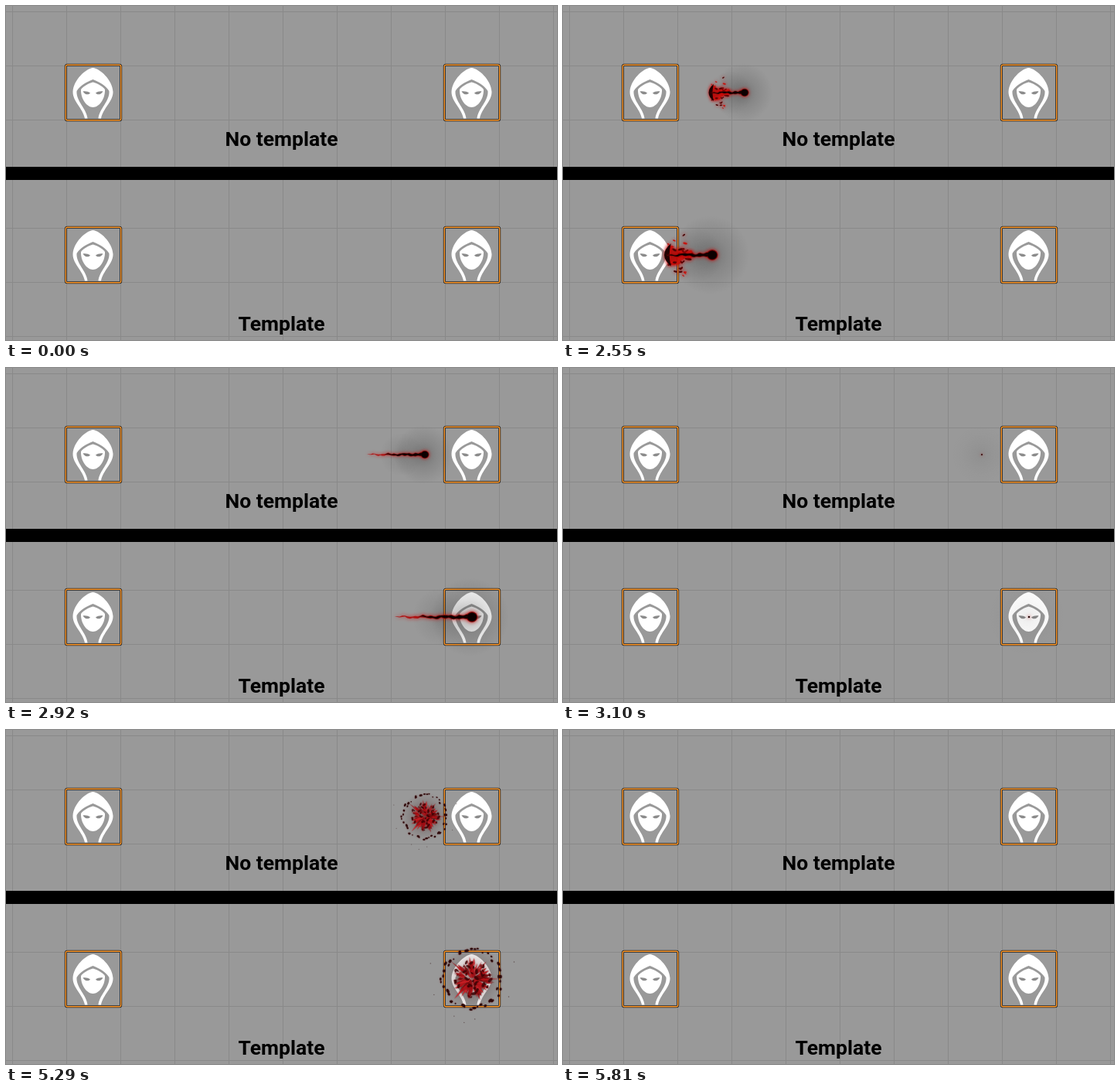
An HTML page with a canvas that plays this animation: 713x432 px, repeating every 6140 ms.

```html
<!DOCTYPE html>
<html lang="en">
<head>
<meta charset="utf-8">
<title>Template comparison</title>
<style>
  html, body { margin: 0; width: 100%; height: 100%; overflow: hidden; background: #999; }
  canvas { display: block; }
</style>
</head>
<body>
<canvas id="stage" width="713" height="432"></canvas>
<script>
const W = 713, H = 432, LOOP = 6140, TAU = Math.PI * 2;
const ctx = document.getElementById('stage').getContext('2d');

// Both lanes play the same effect; only its end point and scale differ.
const LANES = [{ x: 542, y: 112, scale: 1 }, { x: 603, y: 322, scale: 1.335 }];
const MUZZLE = -352;

function seeded(seed) {
  const next = () => (seed = (seed * 16807) % 2147483647) / 2147483647;
  return (lo, hi) => lo + (hi - lo) * next();
}
const many = (n, make) => Array.from({ length: n }, (_, i) => make(i));
const clamp = (v, lo = 0, hi = 1) => Math.min(hi, Math.max(lo, v));

const HOOD = new Path2D(
  'M0-32C9-31 25-17 26-1C26 12 13 20 10.5 33.5L7 33.5C8 21 22 11 21-2' +
  'C17-9 8-14 0-17C-8-14-17-9-21-2C-22 11-8 21-7 33.5L-10.5 33.5' +
  'C-13 20-26 12-26-1C-25-17-9-31 0-32Z');
const FACE = new Path2D('M0-13.5C6-12 12-8.5 15.5-4C16 8 8 19 0 19C-8 19-16 8-15.5-4C-12-8.5-6-12 0-13.5Z');
const EYES = new Path2D('M-13-1.5C-10-2-6-1.5-3.5 .5C-5 3-10 3.5-13-1.5ZM13-1.5C10-2 6-1.5 3.5 .5C5 3 10 3.5 13-1.5Z');

function token(x, y) {
  ctx.save();
  ctx.translate(x, y);
  ctx.fillStyle = '#fff';
  ctx.fill(HOOD);
  ctx.fill(FACE);
  ctx.fillStyle = '#8b8b8b';
  ctx.fill(EYES);
  ctx.translate(0.5, 0);
  ctx.beginPath();
  ctx.roundRect(-35.7, -35.7, 71.4, 71.4, 2);
  ctx.strokeStyle = 'rgba(0,0,0,.8)';
  ctx.lineWidth = 3;
  ctx.stroke();
  ctx.strokeStyle = '#ff9829';
  ctx.lineWidth = 1.4;
  ctx.stroke();
  ctx.restore();
}

function label(text, x, y) {
  ctx.fillStyle = '#000';
  ctx.font = 'bold 26.5px Roboto, sans-serif';
  ctx.textAlign = 'center';
  ctx.fillText(text, x, y);
}

function callout(text, x) {
  label(text, x, 57);
  ctx.strokeStyle = '#f00';
  ctx.lineWidth = 2;
  ctx.beginPath();
  ctx.moveTo(x, 63);
  ctx.lineTo(x, 94);
  ctx.moveTo(x - 36, 109);
  ctx.lineTo(x - 36, 94);
  ctx.lineTo(x + 36, 94);
  ctx.lineTo(x + 36, 109);
  ctx.stroke();
}

function board() {
  ctx.fillStyle = '#999';
  ctx.fillRect(0, 0, W, H);
  ctx.fillStyle = '#898989';
  for (let x = 8; x < W; x += 70) ctx.fillRect(x, 0, 1, H);
  for (let y = 7; y < H; y += 70) ctx.fillRect(0, y, W, 1);
  ctx.fillStyle = '#000';
  ctx.fillRect(0, 208, W, 17);
  for (const y of [112, 322]) for (const x of [112.5, 602.5]) token(x, y);
  label('No template', 356.5, 181);
  label('Template', 356.5, 420);
}

function cloud(x, y, r, color, alpha) {
  const g = ctx.createRadialGradient(x, y, 0, x, y, r);
  g.addColorStop(0, `rgba(${color},${alpha})`);
  g.addColorStop(0.45, `rgba(${color},${alpha * 0.45})`);
  g.addColorStop(1, `rgba(${color},0)`);
  ctx.fillStyle = g;
  ctx.fillRect(x - r, y - r, 2 * r, 2 * r);
}

function oval(x, y, rx, ry, turn, color) {
  ctx.fillStyle = color;
  ctx.beginPath();
  ctx.ellipse(x, y, rx, ry, turn, 0, TAU);
  ctx.fill();
}

function glow(color, blur) {
  ctx.shadowColor = color;
  ctx.shadowBlur = blur;
}

// Ragged band that widens from its tail toward its head.
function ribbon(from, to, half, color) {
  const n = 30, upper = [], lower = [];
  for (let i = 0; i <= n; i++) {
    const p = i / n, x = from + (to - from) * p, d = x - to;
    const mid = (Math.sin(d * 0.3) * 0.7 + Math.sin(d * 0.71 + 1) * 0.5) * (1 - p * 0.6);
    const h = half * Math.pow(p, 0.6) * (0.8 + 0.25 * Math.sin(d * 0.9));
    upper.push([x, mid - h]);
    lower.unshift([x, mid + h]);
  }
  ctx.fillStyle = color;
  ctx.beginPath();
  for (const [x, y] of upper.concat(lower)) ctx.lineTo(x, y);
  ctx.fill();
}

const spray = (() => {
  const r = seeded(71);
  return many(46, i => {
    const far = i % 4 === 0;
    const x = far ? r(6, 20) : r(2, 24);
    const reach = far ? 25 : 13 - x * 0.38;
    return { x, y: r(-1, 1) * reach, size: r(0.7, far ? 1.5 : 2.2), turn: r(-0.9, 0.9), dark: r(0, 1) < 0.4 };
  });
})();

function muzzle(b, k) {
  const grow = clamp(b / 6, 0.15), fade = clamp((13 - b) / 7);
  if (!fade) return;
  const drift = Math.max(0, b - 6) * 0.8;
  ctx.save();
  ctx.globalAlpha = fade;
  ctx.translate(MUZZLE + drift, 0);
  glow('#c00', 4 * k);
  ctx.fillStyle = 'rgba(165,12,8,.75)';
  ctx.beginPath();
  ctx.moveTo(2, -9 * grow);
  ctx.quadraticCurveTo(11, -4, 27 * grow, -2);
  ctx.lineTo(27 * grow, 2);
  ctx.quadraticCurveTo(11, 4, 2, 9 * grow);
  ctx.fill();
  for (const s of spray) {
    oval(s.x * grow, s.y * grow, s.size * 1.5, s.size * 0.7, s.turn, s.dark ? '#4a0404' : '#c5140e');
  }
  ctx.fillStyle = '#1c0000';
  ctx.beginPath();
  ctx.moveTo(5, -11 * grow);
  ctx.quadraticCurveTo(-8, 0, 5, 11 * grow);
  ctx.quadraticCurveTo(2, 0, 5, -11 * grow);
  ctx.fill();
  ctx.restore();
}

function bolt(b, k) {
  const head = b < 6 ? MUZZLE + 7.5 * b : -307 * clamp((17 - b) / 11);
  const len = b < 17 ? Math.min(head - MUZZLE, 100) : 100 * Math.pow(clamp((24.5 - b) / 7.5), 2);
  const tail = head - len, size = clamp((25 - b) / 6) * clamp(b / 4);
  if (!size) return;
  cloud(head - 2, 0, 38, '50,50,50', 0.36 * size);
  cloud(head - len * 0.4, 0, 28, '60,60,60', 0.22 * size);
  muzzle(b, k);
  ctx.save();
  glow('#d00000', 4 * k);
  ribbon(tail, head, 2.6 * size, 'rgba(175,8,8,.85)');
  oval(head, 0, 5.3 * size, 5 * size, 0, '#8d0606');
  glow('#300', 1.5 * k);
  ribbon(tail + len * (b > 9 ? 0.3 : 0.03), head, 1.9 * size, '#120000');
  oval(head, 0, 4.5 * size, 4.2 * size, 0, '#0c0000');
  ctx.restore();
}

const splat = (() => {
  const r = seeded(4242);
  const reds = ['#c3161d', '#a40e15', '#d4232a', '#780a0e', '#b8131a'];
  const spikes = [0, 3.84, 2.3, 0.15, 5.4, 4.6, 1.2];
  return {
    streaks: many(100, i => {
      const spike = i < spikes.length;
      return {
        angle: spike ? spikes[i] : r(0, TAU),
        from: spike ? 6 : r(0, 13),
        to: spike ? (i < 3 ? 29 - i : 23) : r(13, 21),
        half: r(0.8, 2), life: r(0.4, 0.97), color: reds[i % reds.length]
      };
    }),
    clots: many(42, () => ({
      angle: r(0, TAU), dist: Math.sqrt(r(0, 1)) * 18, size: r(0.7, 2.1),
      turn: r(0, 3), life: r(0.35, 0.9)
    })),
    ring: many(42, i => ({
      angle: i / 42 * TAU + r(-0.09, 0.09), dist: r(24.5, 29),
      size: r(1, 2.1), long: r(1, 1.8), life: r(0.5, 0.95)
    })),
    specks: many(7, i => ({ angle: [2.75, 2.02, 1.5, 0.45, 3.5, 1.75, 5.9][i], dist: r(36, 43) }))
  };
})();

// grow: burst size, q: share of the dissolve already done
function burst(grow, q, k) {
  const left = life => clamp(1 - q / life);
  ctx.save();
  ctx.scale(grow, grow);
  cloud(0, 0, 31, '45,5,5', 0.5 * (1 - q));
  glow('rgba(90,0,0,.6)', 1.5 * k);
  for (const s of splat.streaks) {
    const f = left(s.life);
    if (!f) continue;
    ctx.save();
    ctx.rotate(s.angle);
    ctx.fillStyle = s.color;
    ctx.globalAlpha = 0.85 * Math.sqrt(f);
    ctx.beginPath();
    ctx.moveTo(s.from, 0);
    ctx.lineTo(s.from + 3, -s.half * f);
    ctx.lineTo(s.from + 3 + (s.to - s.from - 3) * f, 0);
    ctx.lineTo(s.from + 3, s.half * f);
    ctx.fill();
    ctx.restore();
  }
  ctx.globalAlpha = 0.8;
  for (const c of splat.clots) {
    const f = left(c.life);
    oval(Math.cos(c.angle) * c.dist, Math.sin(c.angle) * c.dist, c.size * 1.4 * f, c.size * 0.7 * f, c.turn, '#3a0305');
  }
  ctx.globalAlpha = 0.92;
  const spread = q ? 1.05 + q * 0.12 : 1, shrink = q ? 0.72 : 1;
  for (const d of splat.ring) {
    const f = left(d.life) * shrink, dist = d.dist * spread;
    oval(Math.cos(d.angle) * dist, Math.sin(d.angle) * dist, d.size * f, d.size * d.long * f, d.angle, '#260405');
  }
  ctx.shadowBlur = 0;
  ctx.globalAlpha = 0.6 * (1 - q);
  for (const s of splat.specks) {
    const dist = s.dist * spread;
    oval(Math.cos(s.angle) * dist, Math.sin(s.angle) * dist, 0.6, 0.5, 0, '#3a2020');
  }
  ctx.restore();
}

function effect(t, k) {
  if (t >= 400 && t < 3130) {
    const step = t < 2550
      ? Math.min(6, 1 + Math.floor((t - 400) / 30))
      : 6 + Math.floor((t - 2550) / 30.5);
    bolt(step, k);
  } else if (t >= 3190 && t < 5290) {
    burst(t < 3240 ? 0.5 : t < 3290 ? 0.8 : 1, 0, k);
  } else if (t >= 5290 && t < 5810) {
    burst(1, (Math.floor((t - 5290) / 32.5) + 1) / 17, k);
  }
}

function draw(t) {
  board();
  for (const lane of LANES) {
    ctx.save();
    ctx.translate(lane.x, lane.y);
    ctx.scale(lane.scale, lane.scale);
    effect(t, lane.scale);
    ctx.restore();
  }
  if (t >= 550 && t < 2550) callout('START POINT', 149);
  if (t >= 3290 && t < 5290) callout('END POINT', 566);
}

const start = performance.now();
function tick() {
  draw((performance.now() - start) % LOOP);
  requestAnimationFrame(tick);
}
tick();
</script>
</body>
</html>
```
